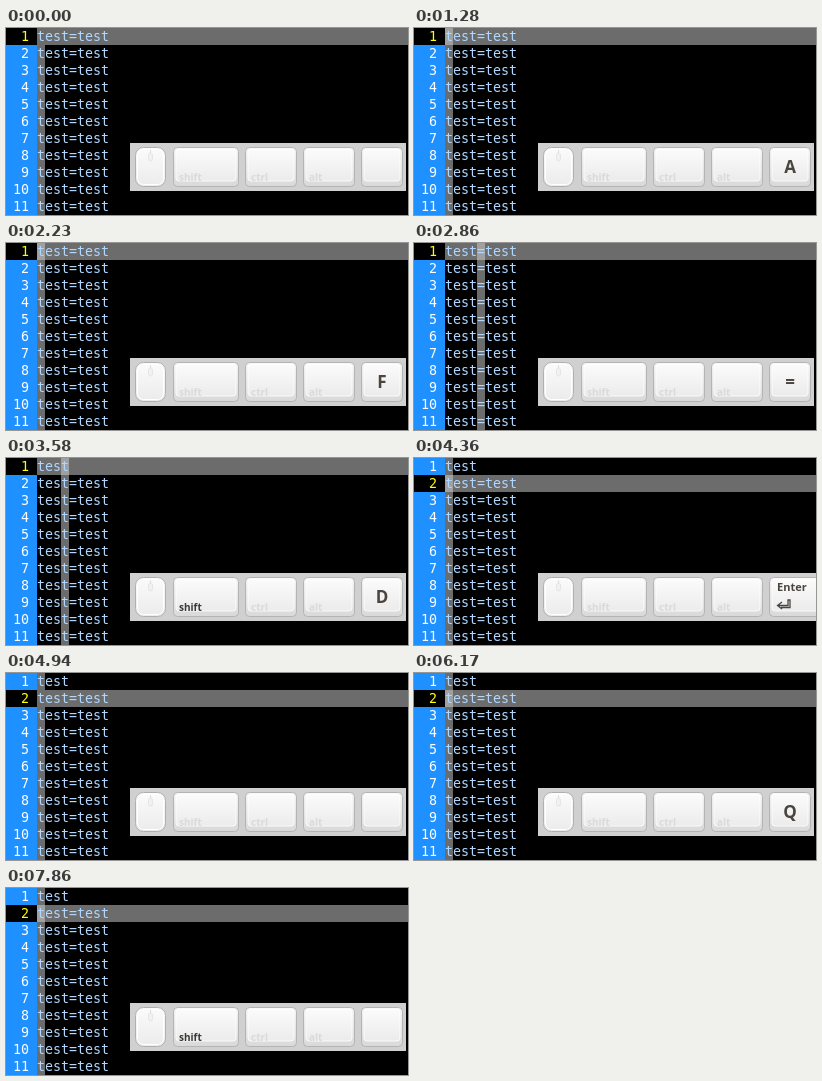
Animation of 402 by 187 pixels, one loop 8 s. Source, as an HTML page:

```html
<!DOCTYPE html>
<html lang="en">
<head>
<meta charset="utf-8">
<title>Recording a macro</title>
<style>
html, body { margin: 0; width: 100%; height: 100%; overflow: hidden; background: #000; }
svg { display: block; width: 402px; height: 187px; }
.term { font: 13.333px "DejaVu Sans Mono", monospace; letter-spacing: -0.027px; white-space: pre; }
.code { fill: #afd7ff; }
.num { fill: #fff; text-anchor: end; }
.num.now { fill: #ff0; }
.small { font: 700 10px "Open Sans", "Noto Sans", sans-serif; fill: #dadada; }
.small.on { fill: #3c3934; }
.big { font: 700 17px "Open Sans", "Noto Sans", sans-serif; fill: #4a453e; text-anchor: middle; }
.enter { font: 700 11px "Open Sans", "Noto Sans", sans-serif; fill: #4a453e; }
</style>
</head>
<body>
<svg id="stage" viewBox="0 0 402 187">
  <defs>
    <linearGradient id="side" x2="0" y2="1">
      <stop offset="0" stop-color="#f4f4f4"/>
      <stop offset="1" stop-color="#d9d9d9"/>
    </linearGradient>
    <linearGradient id="face" x2="0" y2="1">
      <stop offset="0" stop-color="#fbfbfb"/>
      <stop offset="1" stop-color="#ebebeb"/>
    </linearGradient>
  </defs>
</svg>
<script>
const LOOP = 8000, ROWS = 11, LINE = 17, CELL = 8, LEFT = 31;
const GRAY = '#6c6c6c';
const stage = document.getElementById('stage');

function add(tag, attrs, text) {
  const el = document.createElementNS('http://www.w3.org/2000/svg', tag);
  for (const name in attrs) el.setAttribute(name, attrs[name]);
  if (text !== undefined) el.textContent = text;
  stage.appendChild(el);
  return el;
}

function rect(x, y, width, height, fill, more) {
  return add('rect', { x, y, width, height, fill, ...more });
}

function set(el, attrs) {
  for (const name in attrs) el.setAttribute(name, attrs[name]);
}

// Editor
rect(0, 0, 402, 187, '#000');
rect(0, 0, LEFT, 187, '#1e90ff');
const numBack = rect(0, 0, LEFT, LINE, '#000');
const rowBar = rect(LEFT, 0, 371, LINE, GRAY);
const colBar = rect(LEFT, 0, CELL, 187, GRAY);
const cursor = rect(LEFT, 0, CELL, LINE, '#a0a0a0');
const nums = [], lines = [];
for (let i = 0; i < ROWS; i++) {
  const y = i * LINE + 13;
  nums.push(add('text', { x: 23, y, class: 'term num' }, i + 1));
  lines.push(add('text', { x: LEFT, y, class: 'term code' }, 'test=test'));
}

// Key display
function key(x, w) {
  const edge = rect(x + .5, 119.5, w - 1, 39, 'url(#side)', { rx: 4, stroke: '#b4b4b4' });
  const top = rect(x + 3, 121, w - 6, 32, 'url(#face)', { rx: 3, stroke: '#fff', 'stroke-opacity': .8 });
  return { edge, top };
}

const panel = rect(124, 115, 276, 48, '#d0d0d0');
rect(129.5, 119.5, 30, 39, 'url(#face)', { rx: 8, stroke: '#b0b0b0' });
rect(131.5, 121.5, 26, 35, 'none', { rx: 6, stroke: '#fff' });
add('path', { d: 'M144.5 122V132', stroke: '#dedede' });
rect(142.5, 125, 4, 8, '#f1f1f1', { rx: 2, stroke: '#e0e0e0', 'stroke-width': .7 });

key(167, 66);
key(239, 52);
key(297, 52);
const lastKey = key(355, 42);
const shift = add('text', { x: 173, y: 152.5 }, 'shift');
add('text', { x: 245, y: 152.5, class: 'small' }, 'ctrl');
add('text', { x: 303, y: 152.5, class: 'small' }, 'alt');
const label = add('text', { x: 376, y: 145, class: 'big' });
const enter = [
  add('text', { x: 363, y: 133, class: 'enter' }, 'Enter'),
  add('path', {
    d: 'M368 144L363.5 147.5L368 151M364 147.5H374V142H376V149.5H367',
    fill: 'none', stroke: '#4a453e', 'stroke-width': 1.3
  })
];

// Each step changes part of the state from its time on.
const steps = [
  [0, { row: 0, col: 0, blink: false, label: '', shift: false, cut: false }],
  [370, { blink: true }],
  [630, { label: 'Q' }],
  [1240, { blink: false }],
  [1280, { blink: true, label: 'A' }],
  [1950, { label: '' }],
  [2230, { label: 'F' }],
  [2860, { label: '=', col: 4 }],
  [3230, { shift: true }],
  [3430, { label: '' }],
  [3540, { label: 'D' }],
  [3580, { col: 3, cut: true }],
  [4120, { shift: false }],
  [4160, { label: '' }],
  [4320, { label: 'Enter' }],
  [4360, { row: 1, col: 0 }],
  [4900, { label: '' }],
  [4940, { blink: false }],
  [5530, { blink: true }],
  [5570, { label: 'Q' }],
  [6210, { label: '', blink: false }],
  [6780, { blink: true }],
  [7240, { label: '9' }],
  [7820, { label: '' }],
  [7860, { shift: true }]
];

function draw(time) {
  const s = {};
  for (const [at, change] of steps) if (at <= time) Object.assign(s, change);

  const x = LEFT + s.col * CELL, y = s.row * LINE;
  set(numBack, { y });
  set(rowBar, { y });
  set(colBar, { x });
  set(cursor, { x, y, visibility: s.blink ? 'visible' : 'hidden' });
  nums.forEach((n, i) => set(n, { class: i === s.row ? 'term num now' : 'term num' }));
  lines[0].textContent = s.cut ? 'test' : 'test=test';

  const wide = s.label === 'Enter';
  set(panel, { width: wide ? 278 : 276 });
  set(lastKey.edge, { width: wide ? 70 : 41 });
  set(lastKey.top, { width: wide ? 65 : 36 });
  enter.forEach(e => set(e, { visibility: wide ? 'visible' : 'hidden' }));
  label.textContent = wide ? '' : s.label;
  set(shift, { class: s.shift ? 'small on' : 'small' });
}

const start = performance.now();
function tick() {
  draw((performance.now() - start) % LOOP);
  requestAnimationFrame(tick);
}
tick();
</script>
</body>
</html>
```
